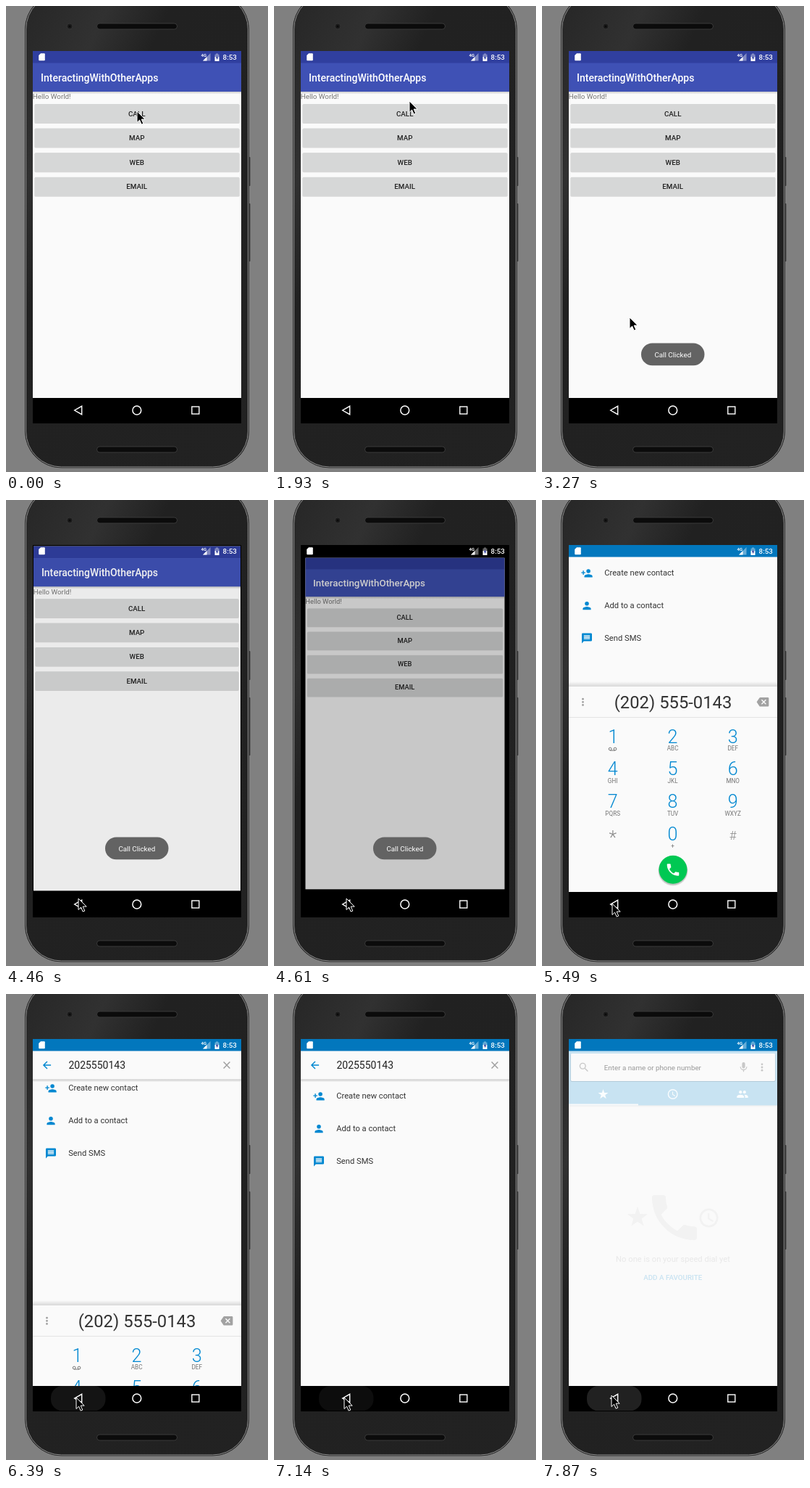
These frames come from a looping animation (362x642 px, 8 s). An HTML page:

```html
<!DOCTYPE html>
<html lang="en">
<head>
<meta charset="utf-8">
<title>Phone demo</title>
<style>
html, body { margin: 0; width: 100%; height: 100%; overflow: hidden; background: #808080; }
svg { display: block; width: 100%; height: 100%; }
text { font-family: Roboto, "Noto Sans", sans-serif; white-space: pre; }
</style>
</head>
<body>
<svg id="stage" viewBox="0 0 362 642"></svg>
<script>
const LOOP = 8000, TICK = 148.5;
const BLUE = '#0288d1', PAPER = '#fafafa';
const NUMBER = '(202) 555-0143';

// ---- drawing helpers ----
const rect = (x, y, w, h, fill, more = '') =>
  `<rect x="${x}" y="${y}" width="${w}" height="${h}" fill="${fill}" ${more}/>`;
const circle = (x, y, r, fill, more = '') =>
  `<circle cx="${x}" cy="${y}" r="${r}" fill="${fill}" ${more}/>`;
const path = (d, fill, more = '') => `<path d="${d}" fill="${fill}" ${more}/>`;
const line = (d, color, width) => path(d, 'none', `stroke="${color}" stroke-width="${width}"`);
const text = (x, y, size, fill, s, weight = 400, anchor = 'start') =>
  `<text x="${x}" y="${y}" font-size="${size}" fill="${fill}" font-weight="${weight}" text-anchor="${anchor}">${s}</text>`;
const mid = (x, y, size, fill, s, weight) => text(x, y, size, fill, s, weight, 'middle');
const group = (id, body, more = '') => `<g id="${id}" ${more}>${body}</g>`;
const shadow = (y, h, id = 'down') => rect(37, y, 288, h, `url(#${id})`);

// icons live on a 24 unit grid, placed by their centre
const icon = (name, x, y, color, s = 0.7) =>
  `<g transform="translate(${x} ${y}) scale(${s}) translate(-12 -12)">${icons[name](color)}</g>`;

const bust = (x, c) => circle(x, 8, 4, c) +
  path(`M${x} 14c-2.7 0-8 1.3-8 4v2h16v-2c0-2.7-5.3-4-8-4z`, c);

const starPath = () => {
  let d = '';
  for (let i = 0; i < 10; i++) {
    const a = i * Math.PI / 5, r = i % 2 ? 4.1 : 10.5;
    d += (i ? 'L' : 'M') + (12 + r * Math.sin(a)).toFixed(2) + ' ' + (12.5 - r * Math.cos(a)).toFixed(2);
  }
  return d + 'z';
};

const icons = {
  person: c => bust(12, c),
  add: c => bust(15, c) + line('M1 11h8M5 7v8', c, 2),
  message: c => path('M4 2h16a2 2 0 0 1 2 2v12a2 2 0 0 1-2 2H6l-4 4V4a2 2 0 0 1 2-2z', c) +
    line('M6 7h12M6 10h12M6 13h12', PAPER, 2),
  more: c => [6, 12, 18].map(y => circle(12, y, 2, c)).join(''),
  erase: c => path('M7 3h15a2 2 0 0 1 2 2v14a2 2 0 0 1-2 2H7q-1 0-1.6-.9L0 12l5.4-8.1Q6 3 7 3z', c) +
    line('M9.7 7.7l8.6 8.6M18.3 7.7l-8.6 8.6', PAPER, 2),
  phone: c => path('M6.6 10.8c1.4 2.8 3.8 5.1 6.6 6.6l2.2-2.2c.3-.3.7-.4 1-.2 1.1.4 2.3.6 3.6.6.6 0 1 .4 1 1V20c0 .6-.4 1-1 1C10.6 21 3 13.4 3 4c0-.6.4-1 1-1h3.5c.6 0 1 .4 1 1 0 1.2.2 2.4.6 3.6.1.3 0 .7-.3 1z', c),
  star: c => path(starPath(), c),
  clock: c => circle(12, 12, 9, 'none', `stroke="${c}" stroke-width="2"`) + line('M11.8 7v5.7l4.8 2.9', c, 1.5),
  people: c => circle(8, 8, 3, c) + circle(16, 8, 3, c) +
    path('M8 13c-2.3 0-7 1.2-7 3.5V19h14v-2.5c0-2.3-4.7-3.5-7-3.5z', c) +
    path('M15 13c1.2.8 2 2 2 3.5V19h6v-2.5c0-2.5-5-3.7-8-3.5z', c),
  search: c => circle(9.5, 9.5, 5.5, 'none', `stroke="${c}" stroke-width="2"`) + line('M14 14l5.7 5.7', c, 2),
  mic: c => rect(9, 2, 6, 12, c, 'rx="3"') + line('M5.8 11a6.2 6 0 0 0 12.4 0M12 17v4', c, 1.8),
  back: c => line('M20 12H5.5M12.7 4.7L5.4 12l7.3 7.3', c, 2),
  close: c => line('M5.7 5.7l12.6 12.6M18.3 5.7L5.7 18.3', c, 2)
};

// ---- parts ----
function phone() {
  const slot = y => rect(125.5, y, 111, 8, '#0b0b0b', 'rx="4" stroke="#3a3a3a" stroke-width="1"');
  return rect(0, 0, 362, 642, '#808080') +
    rect(335, 208, 2.6, 40, '#444', 'rx="1"') + rect(335, 272, 2.6, 80, '#444', 'rx="1"') +
    rect(26.5, -18, 309, 654, 'url(#body)', 'rx="50" stroke="#2a2a2a"') +
    rect(27.6, -17, 306.8, 652, 'none', 'rx="49" stroke="#9a9a9a" stroke-width="0.9"') +
    slot(24) + slot(607) + circle(88, 28, 4, '#1b1b1b', 'stroke="#343434"') + circle(88, 28, 1.5, '#0a0a0a');
}

function app() {
  const button = (label, i) => {
    const y = 135 + i * 33.6;
    return (i ? '' : rect(38, y, 286, 28.5, '#000', 'id="lift" rx="2.5"')) +
      rect(39.4, y + 0.4, 283.2, 26.6, '#000', 'rx="1.6" opacity="0.14"') +
      rect(39.8, y, 282.4, 26, '#d6d7d7', 'rx="1.4"') +
      (i ? '' : rect(39.8, y, 282.4, 26, '#000', 'id="press" rx="1.4"')) +
      mid(180.7, y + 16.5, 9.8, '#212121', label, 500);
  };
  return rect(37, 62, 288, 478, PAPER) + rect(37, 62, 288, 17, '#303f9f') +
    rect(37, 78.5, 288, 39.5, '#3f51b5') + shadow(118, 3.5) +
    text(48, 103.6, 14, '#fff', 'InteractingWithOtherApps', 500) +
    text(36.8, 128.4, 9.8, '#757575', 'Hello World!') +
    ['CALL', 'MAP', 'WEB', 'EMAIL'].map(button).join('') +
    rect(37, 62, 288, 478, '#000', 'id="dim"');
}

function dialpad() {
  const keys = ['1', '2ABC', '3DEF', '4GHI', '5JKL', '6MNO', '7PQRS', '8TUV', '9WXYZ', '*', '0+', '#'];
  const key = (k, i) => {
    const x = [97.7, 180.6, 263.7][i % 3], y = 334.6 + Math.floor(i / 3) * 44.8;
    if (k === '*') return mid(x, y + 4.5, 25, '#8a8a8a', k, 300);
    if (k === '#') return mid(x, y - 1, 17, '#8a8a8a', k, 300);
    return mid(k === '1' ? x + 0.8 : x, y, 25.2, BLUE, k[0], 300) + mid(x, y + 10.5, 8.2, '#757575', k.slice(1));
  };
  const mail = circle(94.2, 343, 1.9, 'none', 'stroke="#757575"') +
    circle(101, 343, 1.9, 'none', 'stroke="#757575"') + line('M94.2 345h6.8', '#757575', 1);
  return shadow(250, 7, 'up') + rect(37, 257, 288, 284, PAPER) + rect(37, 299, 288, 1, '#e4e4e4') +
    icon('more', 56.5, 278.3, '#9e9e9e', 0.68) + icon('erase', 305, 278.3, '#a2a2a2') +
    mid(181, 287.4, 23.8, '#333', NUMBER) + keys.map(key).join('') + mail +
    circle(181, 511, 20.5, '#000', 'opacity="0.1"') + circle(181, 510.4, 20, '#000', 'opacity="0.14"') +
    circle(181, 509.3, 19.5, '#00c853') + icon('phone', 181, 509.5, '#fff', 0.92);
}

function dialer() {
  const rows = [['add', 'Create new contact'], ['person', 'Add to a contact'], ['message', 'Send SMS']];
  const list = rows.map(([name, label], i) =>
    icon(name, 62, 100.8 + i * 44.8, BLUE) + text(86.2, 104 + i * 44.8, 11.2, '#333', label)).join('');
  const header = rect(37, 78, 288, 39.5, PAPER) + shadow(117.5, 4) + icon('back', 56.5, 98, BLUE) +
    text(86.4, 103.2, 14, '#212121', NUMBER.replace(/\D/g, '')) + icon('close', 305, 98, '#9e9e9e');
  const soft = '#d0d0d0';
  const home = rect(37, 78, 288, 75.5, BLUE) + shadow(153.5, 3) + rect(37, 151.5, 96, 2, '#fff') +
    icon('star', 132, 307, soft, 1.4) + icon('phone', 183, 308, soft, 3.44) +
    icon('clock', 230.5, 308.5, soft, 1.3) +
    mid(181, 369.3, 11.2, '#a4a4a4', 'No one is on your speed dial yet') +
    mid(180.7, 394, 9.8, BLUE, 'ADD A FAVOURITE', 500);
  const tabs = icon('star', 84.5, 138, '#fff') + icon('clock', 180.7, 138, '#fff') + icon('people', 277, 138, '#fff');
  const card = rect(39.4, 82.5, 283.2, 38.6, '#000', 'rx="2" opacity="0.1"') + rect(40, 82, 282, 38, PAPER, 'rx="1.4"') +
    icon('search', 58, 101, '#c8c8c8') + text(85.8, 104.5, 9.8, '#9a9a9a', 'Enter a name or phone number') +
    icon('mic', 278.5, 101, '#c8c8c8') + icon('more', 304, 101, '#c8c8c8');
  return rect(37, 62, 288, 478, PAPER) + group('list', list) + group('header', header) +
    group('pad', dialpad()) + group('home', home) + group('tabs', tabs) + group('card', card) +
    rect(37, 62, 288, 16.5, '#0277bd');
}

function statusIcons() {
  return path('M48 65.2h4.8a1 1 0 0 1 1 1v8a1 1 0 0 1-1 1h-6.600a1 1 0 0 1-1-1V68z', '#fff') +
    text(269.5, 70, 6, '#fff', '4G', 700) +
    path('M282.5 65v10.5H272z', '#fff', 'opacity="0.4"') + path('M277.5 70v5.5H272z', '#fff') +
    path('M290 65.5h3v1.200h1.500v3.300h-6v-3.300h1.500z', '#fff', 'opacity="0.4"') + rect(288.5, 70, 6, 6, '#fff') +
    path('M292 68l-2.2 4h1.5v2.6l2.2-4H292z', '#303f9f') +
    text(299.6, 73.8, 9.8, '#fff', '8:53', 500);
}

const navIcons = line('M104.7 551.3v11.4L94.7 557z', '#fff', 1.4) +
  circle(180.8, 557, 5.9, 'none', 'stroke="#fff" stroke-width="1.5"') +
  rect(256.8, 552, 10, 10, 'none', 'stroke="#fff" stroke-width="1.4"');

const toast = rect(137, 464.5, 87.5, 30.8, '#636363', 'rx="15.4"') + mid(180.8, 484, 9.8, '#fff', 'Call Clicked');

const fade = (id, a, b) => `<linearGradient id="${id}" x2="0" y2="1">
  <stop stop-opacity="${a}"/><stop offset="1" stop-opacity="${b}"/></linearGradient>`;

const stage = document.getElementById('stage');
stage.innerHTML = `<defs>${fade('down', 0.19, 0)}${fade('up', 0, 0.14)}
  <linearGradient id="body" x2="1" y2="1"><stop stop-color="#262626"/><stop offset=".2" stop-color="#313131"/>
    <stop offset=".34" stop-color="#212121"/><stop offset="1" stop-color="#222"/></linearGradient>
  <clipPath id="screen">${rect(37, 62, 288, 512, '#000')}</clipPath>
  <clipPath id="window">${rect(37, 62, 288, 478, '#000')}</clipPath></defs>` +
  phone() + rect(37, 62, 288, 513, '#000') +
  `<g clip-path="url(#screen)">` + group('app', app()) +
  rect(37, 540, 288, 35, '#000') + group('dialer', dialer(), 'clip-path="url(#window)"') +
  statusIcons() + group('toast', toast) +
  rect(62, 540, 75.5, 34.5, '#fff', 'id="ripple" rx="16"') + navIcons + '</g>' +
  group('cursor', path('M0 0v15.5l3.6-3.4 2.6 6 2.6-1.1-2.6-5.9h5z', '#000', 'stroke="#fff" stroke-width="1"'));

const $ = {};
stage.querySelectorAll('[id]').forEach(e => $[e.id] = e);

// ---- motion: keys are [tick, value, ...] ----
const tracks = {
  cursor: [[2, 181, 145], [3, 172, 190], [4, 146, 300], [5, 112, 415], [6, 104, 451], [9, 104, 451],
    [10, 105, 479], [11, 107, 405], [12, 152, 240], [13, 187, 131], [14, 183, 143], [15, 181, 146],
    [19, 181, 146], [21, 142, 335], [23, 100, 523], [24, 100, 523], [26, 100, 542], [27, 100, 549],
    [35, 100, 549], [37, 97, 556], [48, 97, 556], [50, 96, 553]],
  press: [[14, 0], [16, 1], [17, 1], [19, 0]],
  toast: [[17, 0], [18, 0.35], [20, 1], [31, 1], [32, 0.6], [33, 0]],
  app: [[29, 1, 0, 0], [30, 0.993, 0, 0.057], [31, 0.955, 7, 0.2], [32, 0.902, 23, 0.4]],
  dialer: [[31, 420, 0], [32, 277.3, 0.79], [33, 55, 1], [34, 0, 1]],
  pad: [[41, 0], [42, 50], [43, 172], [44, 290]],
  list: [[41, 0, 1], [42, 10, 1], [43, 29, 1], [44, 40, 1], [48, 40, 1], [51, 40, 0]],
  header: [[41, 0], [43, 1], [49, 1], [52, 0]],
  card: [[50, 0], [52, 1]],
  home: [[51, 0], [53, 0.2]],
  tabs: [[51, 0], [53, 0.9]],
  ripple: [[40, 0], [41, 0.04], [43, 0.08], [44, 0.12], [47, 0], [48, 0.05], [50, 0.13]]
};

function at(name, k) {
  const keys = tracks[name], i = keys.findIndex(key => key[0] >= k);
  if (i < 0) return keys[keys.length - 1].slice(1);
  if (i === 0) return keys[0].slice(1);
  const a = keys[i - 1], b = keys[i], u = (k - a[0]) / (b[0] - a[0]);
  return a.slice(1).map((v, j) => v + (b[j + 1] - v) * u);
}

const move = (el, x, y) => el.setAttribute('transform', `translate(${x} ${y})`);
const alpha = (el, a) => el.setAttribute('opacity', a);

function draw(t) {
  const k = Math.floor((t + 6) / TICK);
  move($.cursor, ...at('cursor', k));
  const [press] = at('press', k);
  alpha($.press, press * 0.12);
  alpha($.lift, press * 0.18);
  const [scale, dy, dim] = at('app', k);
  $.app.setAttribute('transform', `translate(181 ${301 + dy}) scale(${scale}) translate(-181 -301)`);
  alpha($.dim, dim);
  const [slide, shown] = at('dialer', k);
  move($.dialer, 0, slide);
  alpha($.dialer, shown);
  move($.pad, 0, at('pad', k)[0]);
  const [drop, listAlpha] = at('list', k);
  move($.list, 0, drop);
  alpha($.list, listAlpha);
  for (const id of ['toast', 'header', 'card', 'home', 'tabs', 'ripple']) alpha($[id], at(id, k)[0]);
}

const start = performance.now();
function frame() {
  draw((performance.now() - start) % LOOP);
  requestAnimationFrame(frame);
}
frame();
</script>
</body>
</html>
```
